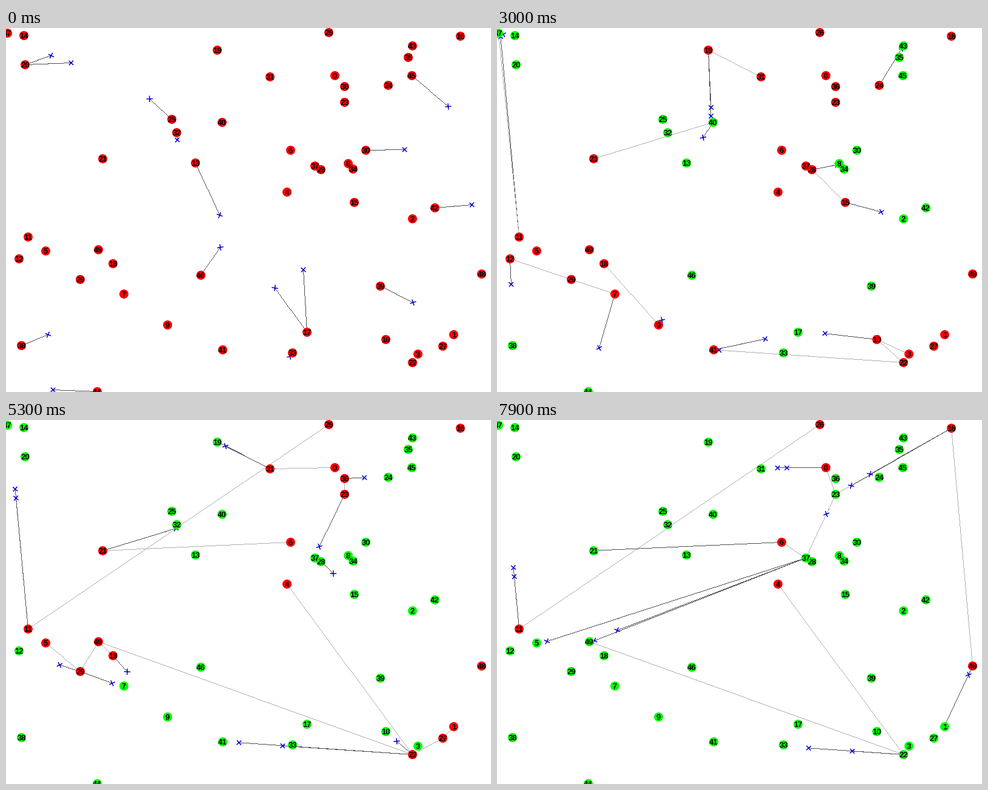
These frames come from a looping animation (800x600 px, 8000 ms). A matplotlib script:

```python
import numpy as np
import matplotlib.pyplot as plt
from matplotlib.animation import FuncAnimation
from matplotlib.patches import Circle

W, H, DPI = 800, 600, 100
FRAMES, STEP_MS = 80, 100
PX = 72 / DPI            # one pixel in points
SPEED, REACH = 5, 3.2    # pixels per step, arrival distance
AUCTION = 10             # steps between two rounds of bidding
RED, GREEN, BLUE = "#ff0000", "#00ff00", "#0000d8"
DARK, LIGHT, WHITE = 80, 176, 255

SITES = np.array([
    (542, 78), (738, 505), (670, 314), (679, 537), (463, 270),
    (65, 367), (469, 201), (194, 438), (564, 223), (266, 489),
    (626, 513), (36, 344), (21, 380), (312, 222), (29, 12),
    (574, 287), (749, 13), (496, 501), (176, 388), (348, 36),
    (31, 60), (159, 215), (670, 551), (558, 122), (630, 94),
    (273, 150), (532, 7), (720, 524), (519, 233), (122, 414),
    (593, 201), (435, 80), (281, 172), (472, 535), (572, 232),
    (663, 48), (558, 96), (509, 227), (25, 523), (617, 425),
    (356, 155), (357, 530), (707, 296), (670, 29), (150, 599),
    (669, 78), (321, 407), (2, 8), (784, 405), (152, 365)], float)

STARTS = [(768, 291), (657, 200), (729, 129), (468, 541), (443, 428),
          (490, 398), (671, 452), (74, 45), (107, 57), (236.3, 116.3),
          (282, 184), (352, 308), (69, 505), (77, 596), (353, 361)]


class Robot:
    def __init__(self, start):
        self.pos = np.array(start, float)
        self.head = 0
        self.queue = []

    def bid(self, free):
        """Queue the free site nearest to the robot."""
        if free:
            self.queue.append(
                min(free, key=lambda s: np.hypot(*(SITES[s] - self.pos))))

    def aim(self):
        d = SITES[self.queue[0]] - self.pos
        self.head = np.arctan2(d[1], d[0])
        return d, np.hypot(*d)

    def step(self, done):
        if not self.queue:
            return
        d, dist = SITES[self.queue[0]] - self.pos, 0
        dist = np.hypot(*d)
        if dist < REACH:
            done.add(self.queue.pop(0))
        else:
            self.aim()
            self.pos = self.pos + SPEED * d / dist


def simulate():
    robots = [Robot(s) for s in STARTS]
    free, done, log = set(range(len(SITES))), set(), []
    for t in range(FRAMES):
        if t % AUCTION == 0:
            # all bid at once, so several may win the same site
            for r in robots:
                r.bid(free)
            free -= {s for r in robots for s in r.queue}
        for r in robots:
            if t:
                r.step(done)
            else:
                r.aim()
        log.append(([(r.pos, r.head, list(r.queue)) for r in robots],
                    set(done)))
    return log


LOG = simulate()

fig = plt.figure(figsize=(W / DPI, H / DPI), dpi=DPI, facecolor="white")
ax = fig.add_axes([0, 0, 1, 1])
canvas = ax.imshow(np.full((H, W), WHITE, np.uint8), cmap="gray", vmin=0,
                   vmax=255, interpolation="nearest", aspect="auto")
ax.set_xlim(-0.5, W - 0.5)
ax.set_ylim(H - 0.5, -0.5)
ax.axis("off")

marks = [ax.plot([], [], color=BLUE, lw=1.5 * PX, zorder=3,
                 solid_capstyle="butt")[0] for _ in STARTS]
discs = []
for n, (x, y) in enumerate(SITES):
    discs.append(ax.add_patch(Circle((x, y), 7.5, lw=0, zorder=10 + n)))
    ax.text(x, y + 0.3, str(n), ha="center", va="center_baseline",
            family="Liberation Sans", weight="bold", size=13 * PX,
            color="black", zorder=10.5 + n, clip_on=True)


def draw_line(img, a, b, grey):
    """Hard-edged line, one pixel wide."""
    n = int(np.abs(b - a).max()) + 1
    x, y = np.rint(np.linspace(a, b, n + 1)).astype(int).T
    img[y.clip(0, H - 1), x.clip(0, W - 1)] = grey


def draw_cross(artist, p, head, arm=5.2):
    a = head + np.pi / 4
    u = arm * np.array([np.cos(a), np.sin(a)])
    v = np.array([-u[1], u[0]])
    artist.set_data(*np.array([p - u, p + u, (np.nan, np.nan),
                               p - v, p + v]).T)


def update(t):
    robots, done = LOG[t]
    img = np.full((H, W), WHITE, np.uint8)
    for mark, (p, head, queue) in zip(marks, robots):
        stops = [p, *SITES[queue[:2]]] if queue else [p]
        for a, b, grey in zip(stops, stops[1:], (DARK, LIGHT)):
            draw_line(img, a, b, grey)
        draw_cross(mark, p, head)
    canvas.set_data(img)
    for n, disc in enumerate(discs):
        disc.set_facecolor(GREEN if n in done else RED)
    return [canvas, *marks, *discs]


anim = FuncAnimation(fig, update, frames=FRAMES, interval=STEP_MS,
                     repeat=True, repeat_delay=0)
plt.show()
```
